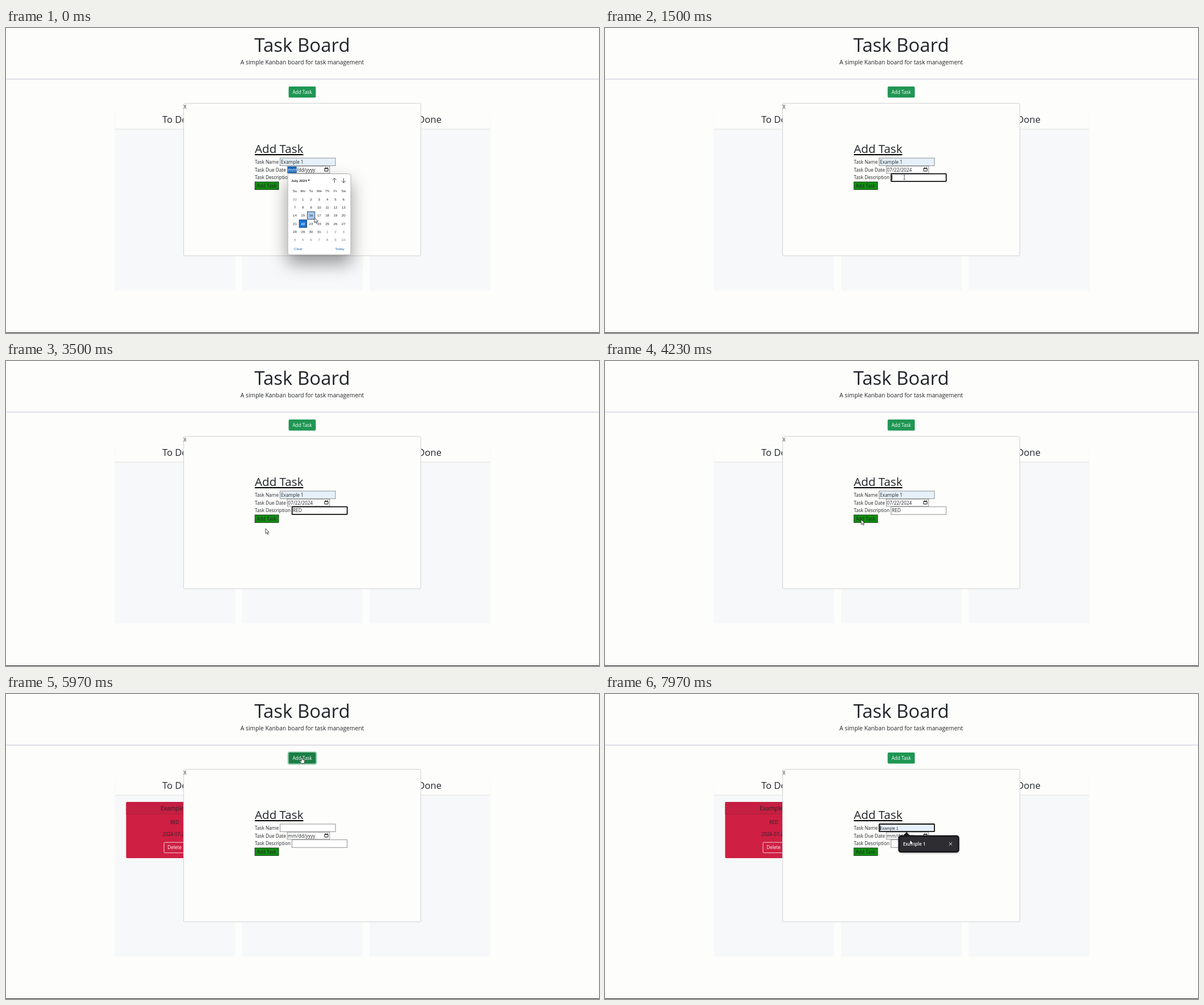
An HTML page for the animation above (8 s loop, 1044 px wide and 537 px high).

```html
<!DOCTYPE html>
<html lang="en">
<head>
<meta charset="utf-8">
<title>Task Board</title>
<style>
html, body { margin: 0; width: 100%; height: 100%; overflow: hidden; background: #fdfdfb; }
svg { display: block; width: 100vw; height: 100vh; }
text { font: 8.25px "Open Sans", "Noto Sans", sans-serif; fill: #212529; white-space: pre; }
.mid { text-anchor: middle; }
.white { fill: #fff; }
.field { fill: #fff; stroke: #858585; stroke-width: .9; }
.focus { fill: none; stroke: #101010; stroke-width: 1.8; }
#picker text { font: 6.2px "Liberation Sans", Arial, sans-serif; text-anchor: middle; }
#picker .bold { font-weight: bold; }
#picker .muted { fill: #777; }
#picker .link { fill: #1a62b0; }
#picker .white { fill: #fff; }
#preview { font: 6.9px "Liberation Sans", Arial, sans-serif; }
.tip text { font-size: 8px; font-weight: 600; fill: #fff; }
</style>
</head>
<body>
<svg id="stage" viewBox="0 0 1044 537"></svg>
<script>
const LOOP = 8000;
const COL = 14.28, ROW = 14.25, GRID_X = 501.4, GRID_Y = 294.6;

const text = (x, y, str, cls = '', size = '') =>
  `<text x="${x}" y="${y}" class="${cls}"${size && ` style="font-size:${size}px"`}>${str}</text>`;
const rect = (x, y, w, h, attrs = '') =>
  `<rect x="${x}" y="${y}" width="${w}" height="${h}" ${attrs}/>`;
const group = (id, body, attrs = '') => `<g id="${id}" ${attrs}>${body}</g>`;

const column = (x, title) =>
  rect(x, 148, 212.3, 30, 'fill="#fdfdfc" stroke="#f5f5f3" stroke-width=".5"') +
  rect(x, 178, 212.3, 284, 'fill="#f6f8f9"') +
  rect(x, 177.5, 212.3, 1, 'fill="#e2e1dd"') +
  text(x + 106, 167, title, 'mid', 16.5);

const card = rect(211.5, 190, 171, 99, 'rx="2" fill="#cf1f43"') +
  '<path d="M211.5 211.5v-19.5a2 2 0 0 1 2-2h167a2 2 0 0 1 2 2v19.5z" fill="#c51f41"/>' +
  rect(211.5, 211, 171, .7, 'fill="#a31c38"') +
  text(297, 205, 'Example 1', 'mid', 10.3) +
  text(297, 229.3, 'RED', 'mid') +
  text(297, 249.7, '2024-07-22', 'mid') +
  rect(278.2, 261.2, 37.2, 18.4, 'rx="2" fill="none" stroke="#f4e4e8" stroke-width=".9"') +
  text(296.8, 273.3, 'Delete', 'mid white');

const modal = rect(312.7, 132.6, 417.6, 268.4, 'rx="2" fill="#fdfdfb" stroke="#d0d0d6"') +
  text(312.8, 142, 'X') +
  `<g text-decoration="underline">${text(438, 220, 'Add Task', '', 20.6)}</g>` +
  text(438, 238.8, 'Task Name') + text(438, 252.7, 'Task Due Date') + text(438, 266.4, 'Task Description') +
  rect(482.5, 229, 97.5, 13.4, 'id="nameBox" class="field"') +
  text(484, 238.8, 'Example 1', '" id="name') +
  text(484, 238.6, 'Example 1', '" id="preview') +
  rect(495.3, 243.2, 74.5, 12.6, 'class="field"') +
  rect(496, 244, 15.7, 11.4, 'id="dateMark" fill="#1668c0"') +
  text(496.3, 252.7, '<tspan id="month"></tspan><tspan id="rest"></tspan>') +
  '<path d="M561 247h6v5h-6zM561 247.2h6M562.4 245.4v1.4M565.6 245.4v1.4" fill="none" stroke="#111"/>' +
  rect(503.5, 256.7, 97.2, 13.5, 'class="field"') +
  text(505, 266.4, '', '" id="desc') +
  rect(438.2, 271, 41.8, 13.4, 'fill="#118d11" stroke="#143014" stroke-width=".9"') +
  text(441.6, 280.7, 'Add Task') +
  rect(482.7, 229, 97.2, 13.2, 'id="nameFocus" class="focus" rx="1"') +
  rect(503.7, 256.7, 97, 13.4, 'id="descFocus" class="focus" rx="1"') +
  rect(0, 0, 1, 9, 'id="caret" fill="#111"');

const day = i => {
  const n = i === 0 ? 30 : i <= 31 ? i : i - 31;
  const cls = i === 22 ? 'white bold' : i === 0 || i > 31 ? 'muted' : '';
  return text(508.5 + i % 7 * COL, 303.9 + Math.floor(i / 7) * ROW, n, cls);
};
const cell = 'stroke="#26384c" stroke-width=".9"';
const picker =
  rect(496.2, 256.7, 110.8, 142.6, 'rx="2.5" fill="#fff" stroke="#aaa" stroke-width=".8" style="filter:drop-shadow(0 15px 15px #0006)"') +
  text(516, 270.6, 'July 2024', 'bold') +
  '<path d="M531 267h4l-2 2.4z" fill="#222"/>' +
  '<path d="M578.3 272.5v-8m-3.4 3.4l3.4-3.4 3.4 3.4M594.5 264.5v8m-3.4-3.4l3.4 3.4 3.4-3.4" fill="none" stroke="#333" stroke-width=".9"/>' +
  ['Su', 'Mo', 'Tu', 'We', 'Th', 'Fr', 'Sa'].map((d, i) => text(508.5 + i * COL, 289.2, d)).join('') +
  rect(0, 0, 13.2, 13.4, `id="hoverDay" fill="#a9cdf2" ${cell}`) +
  rect(516.2, 337.8, 13.4, 13.4, `fill="#1473e0" ${cell}`) +
  Array.from({ length: 42 }, (_, i) => day(i)).join('') +
  text(514.5, 391, 'Clear', 'link') + text(587.5, 391, 'Today', 'link');

const tip = (id, x, y, str) => group(id,
  `<path d="M8.5 .5L14.5 -6 20.5 .5z" fill="#17171a"/>` +
  rect(1, 1, 105, 28, 'rx="3.5" fill="#17171a" stroke="#17171a" stroke-width="2.4"') +
  text(8.2, 18, str), `class="tip" transform="translate(${x} ${y})" style="filter:drop-shadow(0 1px 1.5px #0004)"`);

document.getElementById('stage').innerHTML =
  rect(0, 0, 1044, 537, 'fill="#fdfdfb"') +
  text(521.5, 42, 'Task Board', 'mid', 33) +
  text(521.5, 64, 'A simple Kanban board for task management', 'mid', 10.3) +
  rect(0, 89, 1044, 2, 'fill="#dedee7"') +
  rect(496.6, 102.2, 49.8, 21.2, 'id="ring" rx="3" fill="none" stroke="#93cdac" stroke-width="2"') +
  rect(497.6, 103.1, 47.8, 19.4, 'id="add" rx="2"') +
  text(521.5, 116, 'Add Task', 'mid white') +
  column(191.4, 'To Do') + column(415.8, 'In Progress') + column(640, 'Done') +
  rect(0, 536, 1044, 1, 'fill="#24241f"') +
  group('card', card) + group('modal', modal) + group('picker', picker) +
  tip('descTip', 537.5, 277, 'RED') + tip('nameTip', 516.5, 249, 'Example 1') +
  group('tipHover', rect(518.8, 251.2, 102.4, 25.6, 'rx="2.5" fill="#2d2d32"') +
    `<g class="tip">${text(524.7, 267, 'Example 1')}</g>` +
    '<path d="M605.7 261l5.6 5.6m0-5.6l-5.6 5.6" stroke="#eee" stroke-width="1"/>') +
  group('pointer',
    '<path id="arrow" d="M0 0V8.8L2 7 3.4 10.2 4.9 9.5 3.5 6.4H6z" fill="#fff" stroke="#222" stroke-width=".8"/>' +
    '<path id="beam" d="M-1.6 -3.8H1.6M0 -3.8V3.8M-1.6 3.8H1.6" fill="none" stroke="#333" stroke-width=".8"/>' +
    '<path id="hand" d="M-1 0Q0 -1.2 1 0V3.6L4 4.3Q5 4.6 4.8 6L4 10H-1.2L-3.8 6.4Q-3.8 5 -2.4 5.6L-1 6.6z" fill="#fff" stroke="#222" stroke-width=".7"/>');

const el = {};
document.querySelectorAll('[id]').forEach(e => el[e.id] = e);
const show = (id, on) => el[id].style.display = on ? '' : 'none';

// Pointer stops: time, x, y
const path = [
  [0, 543, 334], [150, 543, 334], [600, 524, 342], [950, 524, 342], [1300, 527, 263],
  [2850, 527, 263], [3350, 457, 295], [3700, 457, 295], [4050, 451, 279], [5000, 451, 279],
  [5600, 521, 112], [6100, 521, 112], [6650, 515, 235.5], [7400, 515, 235.5], [7750, 537, 257], [LOOP, 537, 257]
];
function pointerAt(t) {
  const i = path.findIndex(p => p[0] > t);
  const [t0, x0, y0] = path[i - 1], [t1, x1, y1] = path[i];
  const u = (t - t0) / (t1 - t0), k = u * u * (3 - 2 * u);
  return [x0 + (x1 - x0) * k, y0 + (y1 - y0) * k];
}

function draw(t) {
  const within = (a, b) => t >= a && t < b;
  const [x, y] = pointerAt(t);
  const over = (l, tp, r, b) => x > l && x < r && y > tp && y < b;
  const picking = t < 900, filled = t < 4350, open = filled || t >= 5900;
  const descFocus = within(1350, 4150), nameFocus = t >= 6850;
  const typed = 'RED'.slice(0, [2050, 2400, 2700].filter(s => t >= s).length);
  const tipHover = t >= 7000 && over(516, 249, 624, 279);

  show('modal', open);
  show('picker', picking);
  show('card', t >= 4350);
  show('name', filled);
  show('preview', tipHover);
  el.nameBox.style.fill = filled || tipHover ? '#e6f0fa' : '';

  show('dateMark', picking);
  el.month.style.fill = picking ? '#fff' : '';
  const [month, rest] = picking || !filled ? ['mm', '/dd/yyyy'] : ['07', '/22/2024'];
  el.month.textContent = month;
  el.rest.textContent = rest;

  el.desc.textContent = filled ? typed : '';
  show('descFocus', descFocus);
  show('nameFocus', nameFocus);
  show('descTip', within(2050, 2700));
  show('nameTip', t >= 7000);
  show('tipHover', tipHover);

  const since = t - (nameFocus ? 6850 : [2700, 2400, 2050, 1350].find(s => t >= s));
  show('caret', (descFocus || nameFocus) && since % 1000 < 500);
  el.caret.setAttribute('x', nameFocus ? 484 : 504.8 + [0, 5.1, 9.7, 15.7][typed.length]);
  el.caret.setAttribute('y', nameFocus ? 231.2 : 259);

  const col = Math.floor((x - GRID_X) / COL), row = Math.floor((y - GRID_Y) / ROW);
  el.hoverDay.setAttribute('x', GRID_X + col * COL + .6);
  el.hoverDay.setAttribute('y', GRID_Y + row * ROW + .4);

  const onAdd = over(497, 103, 546, 123);
  el.add.setAttribute('fill', onAdd ? '#1a7d46' : '#1f9653');
  show('ring', within(5870, 6850));

  const onField = open && !picking && (over(482, 229, 580, 242.5) || over(503, 256.5, 601, 270.5)) && !tipHover;
  show('hand', onAdd);
  show('beam', onField);
  show('arrow', !onAdd && !onField);
  el.pointer.setAttribute('transform', `translate(${x} ${y})`);
}

function tick(now) {
  draw(now % LOOP);
  requestAnimationFrame(tick);
}
draw(0);
requestAnimationFrame(tick);
</script>
</body>
</html>
```
